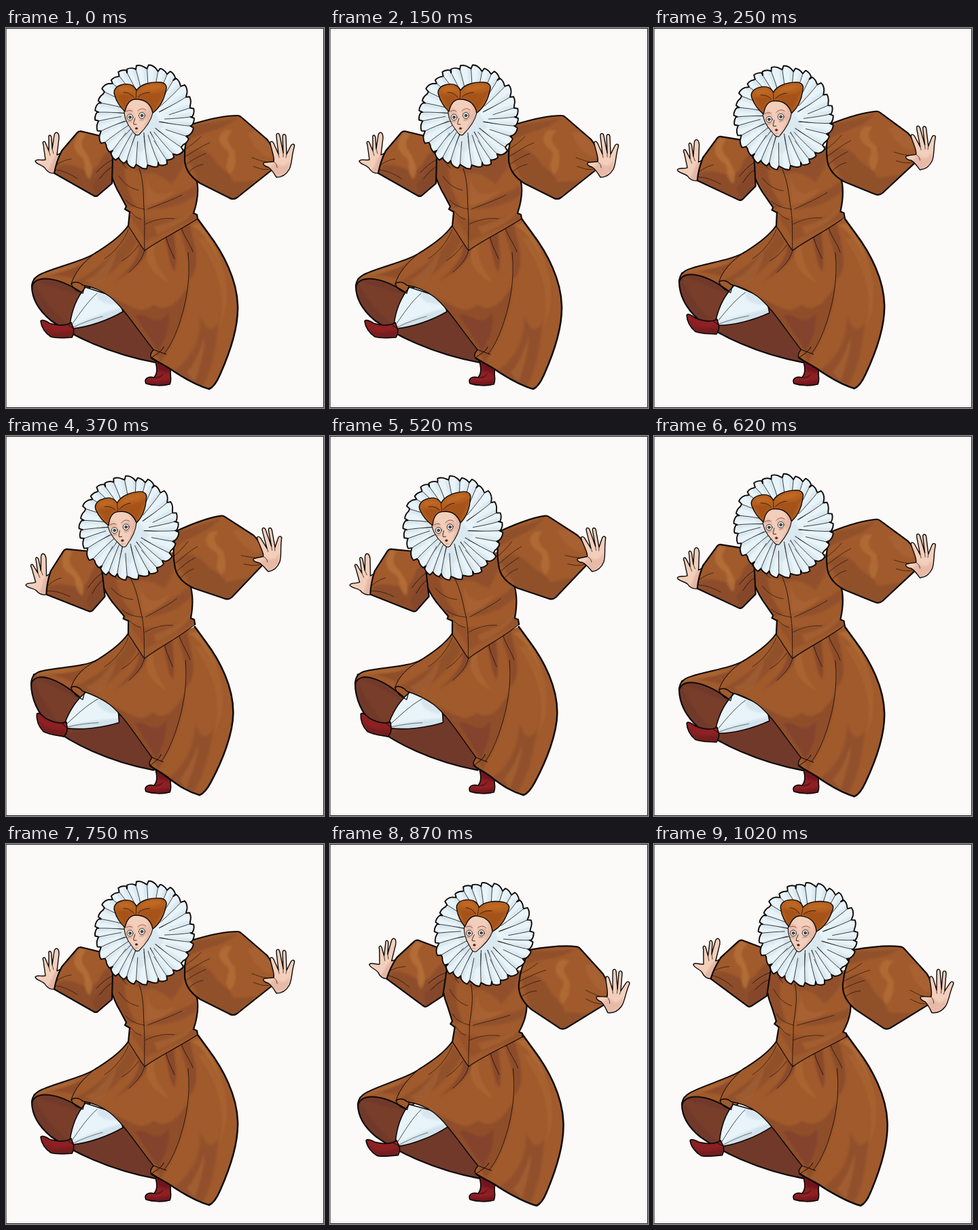
Recreate the animation shown at these times as an HTML page. Size 468 px wide and 560 px high, loop 1120 ms.

```html
<!DOCTYPE html>
<html lang="en">
<head>
<meta charset="utf-8">
<title>Dancing lady in a ruff</title>
<style>
html, body { margin: 0; width: 100%; height: 100%; overflow: hidden; background: #fcfaf8; }
svg { display: block; width: 468px; height: 560px; }
</style>
</head>
<body>
<svg id="stage" viewBox="0 0 468 560" stroke-linejoin="round" stroke-linecap="round"></svg>
<script>
const INK = '#0d0907', CLOTH = '#a05a2c', DARK = '#84472a', DEEP = '#71392a', LIGHT = '#b57039';
const SKIN = '#f3cfbb', BLUSH = '#dba596', SNOW = '#e8f4fa', MIST = '#cbdce6', RED = '#8d2023';

// lean: upper body angle; sway: hem shift; lobe, lift: back hem shift; kick: raised leg angle
const poses = [
  { lean: 7,    sway: 5,   lobe: 3,  lift: 4,   kick: -3, head: [2, 1], left: [1, 0], right: [3, 4] },
  { lean: 0,    sway: 0,   lobe: 0,  lift: 0,   kick: 0,  head: [0, 0], left: [0, 0], right: [0, 0] },
  { lean: -4.5, sway: -4,  lobe: -1, lift: -8,  kick: 5,  head: [0, 1], left: [-1, 0], right: [0, 4] },
  { lean: -8,   sway: -14, lobe: -1, lift: -18, kick: 12.5, head: [0, 3], left: [-1, 0], right: [0, 6] }
];
// [pose, duration in ms]
const steps = [[1, 250], [2, 120], [3, 250], [2, 130], [1, 120], [0, 250]];
const LOOP = steps.reduce((sum, s) => sum + s[1], 0);

let clips = 0;
const unit = v => Math.max(0, Math.min(1, v));
const line = (d, w = 1, color = INK) => `<path d="${d}" fill="none" stroke="${color}" stroke-width="${w}"/>`;
const blob = (d, color, alpha = 1) => `<path d="${d}" fill="${color}" opacity="${alpha}"/>`;
const group = (inner, transform) => `<g transform="${transform}">${inner}</g>`;

// A filled shape with soft shading kept inside its outline; width 0 leaves the outline out
function part(d, fill, shades = '', folds = '', width = 2.2) {
  const id = 'clip' + clips++;
  return `<clipPath id="${id}"><path d="${d}"/></clipPath>` + blob(d, fill) +
    `<g clip-path="url(#${id})"><g filter="url(#soft)">${shades}</g></g>` +
    folds + (width ? line(d, width) : '');
}

// Sends every coordinate pair of the paths through a function
function warp(markup, move) {
  return markup.replace(/ d="([^"]*)"/g, (_, d) => ' d="' +
    d.replace(/([\d.]+) ([\d.]+)/g, (_, x, y) => move(+x, +y).map(v => v.toFixed(1)).join(' ')) + '"');
}

function swing(markup, pose) {
  return warp(markup, (x, y) => {
    const fall = unit((y - 290) / 240);
    const hem = pose.sway * unit((x - 200) / 80) * (.3 + .7 * fall * fall);
    const back = unit((130 - x) / 90);
    return [x + hem + pose.lobe * back, y + hem * .2 * fall + pose.lift * back * unit((450 - y) / 80)];
  });
}

// Leans the torso while the waist stays on the skirt
function bend(markup, pose) {
  return warp(markup, (x, y) => {
    const w = unit((300 - y) / 60), a = pose.lean * w * Math.PI / 180;
    const dx = x - 204, dy = y - 300, hip = pose.sway * .3 * unit((x - 200) / 80) * (1 - w);
    return [204 + dx * Math.cos(a) - dy * Math.sin(a) + hip, 300 + dx * Math.sin(a) + dy * Math.cos(a)];
  });
}

function backSkirt() {
  return part('M38 380C38 400 48 416 66 431C95 452 150 480 220 493L234 480L170 412L113 390C90 375 60 362 42 369Z', DEEP,
      blob('M40 372C50 395 70 420 95 440L125 398Z', '#80432e', .5)) +
    part('M134 330C116 343 78 351 55 361C42 366 38 373 38 381C44 363 76 366 113 391L150 360Z', CLOTH,
      blob('M134 331C110 353 80 361 50 365C80 363 100 366 112 376L150 345Z', DARK, .6) +
      blob('M45 366C70 355 95 350 118 344C95 357 72 363 45 369Z', LIGHT, .5), '', 1.9);
}

function raisedLeg() {
  return part('M117 382C104 397 97 415 94 437L98 443C120 441 150 431 172 418L166 398Z', SNOW,
      blob('M95 440C120 430 146 418 172 412L170 424L98 446Z', MIST, .75) +
      blob('M135 386C130 400 142 408 164 407L170 398Z', MIST, .6),
      line('M97 437C108 421 121 402 134 391', .7) + line('M99 441C113 434 127 429 142 425', .5), 1.6) +
    part('M96 434C87 440 74 438 64 435C58 431 52 429 51 432C52 441 58 450 66 455C77 458 88 456 97 456C100 451 100 445 99 442Z', RED,
      blob('M54 441C65 452 82 449 99 445L98 458L70 460Z', '#6d171c', .7), line('M90 437L98 442', .9), 1.7);
}

function standingFoot() {
  return part('M219 488L243 502C240 510 245 519 241 525C230 528 215 527 206 524C203 517 208 513 218 515C224 508 222 498 219 488Z', RED,
    blob('M218 489L244 501L241 509L224 505ZM206 521C220 524 232 520 244 519L241 528L207 527Z', '#68151b', .75),
    line('M218 515C225 516 229 513 231 510', .8), 1.7);
}

function frontSkirt() {
  const hip = 'M180 291C169 307 150 320 131 332', tuck = 'C115 344 101 360 96 377';
  const hem = 'C100 373 108 374 113 379C125 381 141 387 153 396C174 413 192 443 217 474C213 479 211 483 214 486';
  const side = 'C222 492 238 499 247 506C264 517 281 527 299 532C306 529 310 522 314 513' +
    'C329 480 342 440 341 409C340 371 320 332 298 303L282 281';
  const shades =
    blob('M180 298C178 318 150 345 101 375L130 380C160 358 184 335 193 313Z', DARK, .55) +
    blob('M194 315C200 333 188 350 160 374C184 358 208 343 208 322Z', DARK, .8) +
    blob('M208 325C204 346 212 360 240 376C226 356 216 343 218 318Z', LIGHT, .4) +
    blob('M232 304C239 327 239 345 248 360C253 341 248 320 247 300Z', DARK, .85) +
    blob('M256 295C261 320 275 345 269 372C290 351 276 319 270 286Z', DARK, .7) +
    blob('M268 380C265 425 248 460 228 493L217 473C190 442 172 415 152 396C184 408 196 425 217 408C238 421 252 405 268 380Z', DARK, .6) +
    blob('M190 424C207 417 220 446 239 420C241 445 232 462 224 476Z', DEEP, .45) +
    blob('M286 425C286 462 272 488 245 506L289 529C308 495 309 460 313 434C300 451 295 443 286 425Z', DARK, .5) +
    blob('M282 310C311 352 325 390 314 443C333 400 327 356 299 310Z', LIGHT, .3) +
    blob('M272 290C290 300 308 325 317 350C313 330 300 306 285 288Z', LIGHT, .7) +
    blob('M266 508C280 491 286 475 292 455C292 484 282 505 278 522Z', LIGHT, .4) +
    blob('M117 372C136 364 147 346 162 330C158 353 146 376 128 380Z', LIGHT, .35);
  const folds =
    line(hip, 2) + line('M131 332' + tuck, 1) + line('M96 377' + hem, 1.5) + line('M214 486' + side, 2.5) +
    line('M96 377C99 386 106 388 113 391L116 380', 1.3) +
    line('M268 331C271 361 268 382 264 403C257 435 246 464 233 480', .8) +
    line('M217 474L236 481M214 486C222 480 230 476 232 470', 1) +
    line('M204 327C201 342 190 352 181 360', .7) +
    line('M235 305C237 318 243 328 248 340M258 295C263 309 271 318 275 330', .7) +
    line('M180 297C172 318 156 333 145 340', .6) + line('M195 320C188 331 179 338 171 343', .6);
  return part(hip + tuck + hem + side + 'L204 312Z', CLOTH, shades, folds, 0);
}

function bodice() {
  const left = 'M149 180C150 202 156 226 168 246L177 263L175 267L182 271L180 292';
  const vee = 'C188 303 196 318 204 328C224 313 253 300 282 281', right = 'L281 275L276 273C281 258 284 241 281 226L267 178';
  return part(left + vee + right + 'Z', CLOTH,
    blob('M149 180C153 215 166 247 180 266L192 263C177 239 171 213 177 192Z', DARK, .6) +
    blob('M167 198L262 179C270 200 252 218 244 230C226 216 216 211 202 215Z', DARK, .5) +
    blob('M280 231C267 242 235 250 208 267C238 268 265 258 282 245Z', DARK, .5) +
    blob('M182 275C206 285 245 286 276 271L283 280L206 314Z', DARK, .4) +
    blob('M207 220C212 242 221 253 250 238C235 257 216 261 205 260Z', LIGHT, .35) +
    blob('M218 293C240 287 263 278 276 268C270 283 244 295 223 304Z', LIGHT, .4),
    line(left, 2.2) + line('M180 292' + vee, 1.2) + line('M282 281' + right, 2.2) +
    line('M196 207C203 226 202 247 203 267C205 290 203 309 204 328', .8) +
    line('M204 267C191 265 181 260 176 253M208 267C226 260 248 252 259 246', .6) +
    line('M183 270C188 276 192 280 199 282M205 289C224 280 238 280 248 281', .6) +
    line('M166 218C174 231 185 237 195 239M178 207L171 200', .6), 0);
}

function leftArm() {
  const hand = part('M84 183L75 187L78 162C78 152 72 152 71 158L68 178L67 162C66 156 62 157 63 163L63 181L58 169C56 165 53 168 55 172' +
    'L58 194C52 196 46 192 43 196C44 201 52 201 57 206C60 211 65 215 72 214Z', SKIN,
    blob('M75 186C67 194 67 204 60 211L76 217L82 184Z', BLUSH, .6), line('M63 181L65 188M68 178L70 185', .7), 1.4);
  const sleeve = part('M82 181L105 154Q107 152 110 152L143 160L157 190L156 229L135 247Q132 249 129 247' +
    'L71 214C73 203 77 191 82 181Z', CLOTH,
    blob('M76 203C98 197 111 211 124 209C142 207 136 184 156 180L158 231L132 250L72 217Z', DARK, .65) +
    blob('M109 152C96 169 99 181 111 190C121 199 110 208 123 223C132 206 123 198 120 187C111 176 108 168 118 157Z', LIGHT, .85) +
    blob('M128 230L153 199L157 229L132 248Z', DEEP, .3),
    line('M74 202C83 196 89 194 96 193M73 209C88 211 97 217 105 222', .6) +
    line('M157 194C145 200 139 207 133 213M156 205C147 210 143 216 138 222', .7));
  return hand + sleeve;
}

function rightArm() {
  const sleeve = part('M273 142C299 134 325 129 341 129Q344 129 347 132L384 164C390 171 393 178 395 187L394 207' +
    'L340 250Q334 254 328 250L286 229C272 220 262 207 263 190Q262 168 273 142Z', CLOTH,
    blob('M265 185C284 173 295 180 306 193C314 208 331 212 334 227L371 225L334 254L285 230Z', DARK, .55) +
    blob('M270 145C295 140 321 138 339 132C322 151 290 152 268 165Z', DARK, .55) +
    blob('M322 150C309 160 313 172 326 181C334 191 316 199 330 216C341 203 337 193 337 181C326 170 322 161 334 151Z', LIGHT, .7) +
    blob('M356 154C364 176 372 185 389 191L393 177L372 152Z', LIGHT, .35),
    line('M263 190C275 183 287 174 300 169M265 201C276 193 286 188 294 185', .6) +
    line('M268 213C276 205 284 202 290 201M263 179C272 173 279 168 287 160', .6) +
    line('M391 207C380 211 371 206 364 204M390 198C378 198 369 193 362 191', .6));
  const hand = part('M379 201C377 197 384 198 394 197C396 193 391 180 389 171C388 166 392 166 394 170L401 186L398 160' +
    'C397 154 402 154 403 159L408 184L407 160C407 155 412 156 412 161L413 186L419 174C421 169 426 171 424 176' +
    'C420 190 421 200 417 208C412 217 405 220 398 220C394 214 391 208 386 205Q381 204 379 201Z', SKIN,
    blob('M396 198C409 208 412 202 418 195L416 211L398 222L388 206Z', BLUSH, .5),
    line('M394 197C398 200 399 203 399 206M401 186L402 191M408 184L408 190M413 186L412 191', .7), 1.4);
  return sleeve + hand;
}

function ruff() {
  const count = 29, turn = Math.PI * 2 / count;
  const at = (a, r) => `${(204 + 74 * r * Math.cos(a)).toFixed(1)} ${(131 + 77.5 * r * Math.sin(a)).toFixed(1)}`;
  let edge = '', shades = '', folds = '';
  for (let i = 0; i < count; i++) {
    const a = i * turn + Math.sin(i * 5) * .03, wave = Math.sin(i * 2.7);
    const tip = .985 + wave * .02, dip = .915 + wave * .015;
    edge += `${i ? 'L' : 'M'}${at(a, dip)}L${at(a + turn * .12, tip)}Q${at(a + turn * .5, tip + .01)} ${at(a + turn * .85, dip + .03)}`;
    const inner = .4 + .09 * Math.sin(i * 4.1);
    shades += blob(`M${at(a - turn * .35, .92)}L${at(a, .94)}L${at(a + .08, .3)}Z`, MIST, .6);
    folds += line(`M${at(a, dip)}Q${at(a + .04, .7)} ${at(a + .1, inner)}`, .75);
    if (i % 2) folds += blob(`M${at(a + .04, .65)}L${at(a + .09, .3)}L${at(a + .15, .3)}Z`, INK, .75);
  }
  return part(edge + 'Z', SNOW, shades + blob('M163 112L210 110L232 145L198 184L172 156Z', MIST, .5), folds, 1.9);
}

function eye(x, y) {
  return `<circle cx="${x}" cy="${y}" r="4.4" fill="#f6f6f1" stroke="${INK}" stroke-width=".8"/>` +
    `<circle cx="${x}" cy="${y}" r="1.9" fill="#4b5557" stroke="${INK}" stroke-width=".7"/>`;
}

function head() {
  const face = part('M174 119C174 107 185 103 192 104C206 104 216 112 216 125C213 139 203 150 196 157C192 160 188 155 185 150C178 142 173 130 174 119Z', SKIN,
    blob('M206 108C213 123 210 137 195 158L208 151L219 120Z', BLUSH, .55) +
    blob('M175 121C181 111 191 125 188 138L179 140Z', BLUSH, .45) +
    blob('M194 123L207 121L209 132L198 138Z', BLUSH, .6), '', 1.1);
  const hair = part('M191 105C183 105 178 110 175 123C168 117 162 107 160 99C157 92 162 86 169 84C179 81 188 83 192 92' +
    'C198 83 212 79 227 80C235 81 238 86 235 93C233 105 226 118 216 125C213 111 205 105 191 105Z', '#b5601f',
    blob('M161 96C171 101 180 93 190 103C182 105 177 111 175 122Z', '#98471b', .5) +
    blob('M194 100C209 91 220 101 236 90L216 125C212 111 205 105 194 104Z', '#98471b', .5) +
    blob('M167 87C179 85 185 88 189 95C181 91 174 94 166 93ZM200 89C213 82 225 83 231 86C220 92 211 90 200 95Z', '#c56f2a', .6),
    line('M192 92C191 97 192 100 191 104M194 102C199 97 205 95 211 95M188 102C183 96 178 95 173 95', .7), 1.4);
  const features = eye(182.5, 131.5) + eye(200, 129) +
    line('M177 123C180 121 184 121 186 123M194 122C198 118 203 118 206 121', .8, '#7e3c25') +
    line('M190 133C189 137 187 140 188 142L192 142', .8) +
    line('M178 138L184 138M197 136L203 135', .6, '#a66a62') +
    `<ellipse cx="192" cy="148" rx="2" ry="1.6" fill="#3a1516" stroke="#ad605b" stroke-width=".7"/>` +
    line('M190 153L194 153', .6, '#a86c60');
  return face + hair + features;
}

function lady(pose) {
  const leg = group(raisedLeg(), `rotate(${pose.kick} 150 395)`);
  const upper = group(leftArm(), `translate(${pose.left})`) +
    group(rightArm(), `translate(${pose.right})`) + group(ruff() + head(), `translate(${pose.head})`);
  return swing(backSkirt(), pose) + leg + standingFoot() + swing(frontSkirt(), pose) +
    bend(bodice(), pose) + group(upper, `rotate(${pose.lean} 204 300)`);
}

const stage = document.getElementById('stage');
stage.innerHTML = '<defs><filter id="soft" x="-20%" y="-20%" width="140%" height="140%"><feGaussianBlur stdDeviation="1.5"/></filter></defs>' +
  '<rect width="468" height="560" fill="#fcfaf8"/>' +
  poses.map(p => `<g class="pose" display="none">${lady(p)}</g>`).join('') +
  '<rect x=".5" y=".5" width="467" height="559" fill="none" stroke="#161616"/>';
const views = [...stage.querySelectorAll('.pose')];

function show(time) {
  let t = time % LOOP, i = 0;
  while (t >= steps[i][1]) t -= steps[i++][1];
  views.forEach((view, n) => view.setAttribute('display', n === steps[i][0] ? 'inline' : 'none'));
}

const start = performance.now();
function tick() {
  show(performance.now() - start);
  requestAnimationFrame(tick);
}
tick();
</script>
</body>
</html>
```
